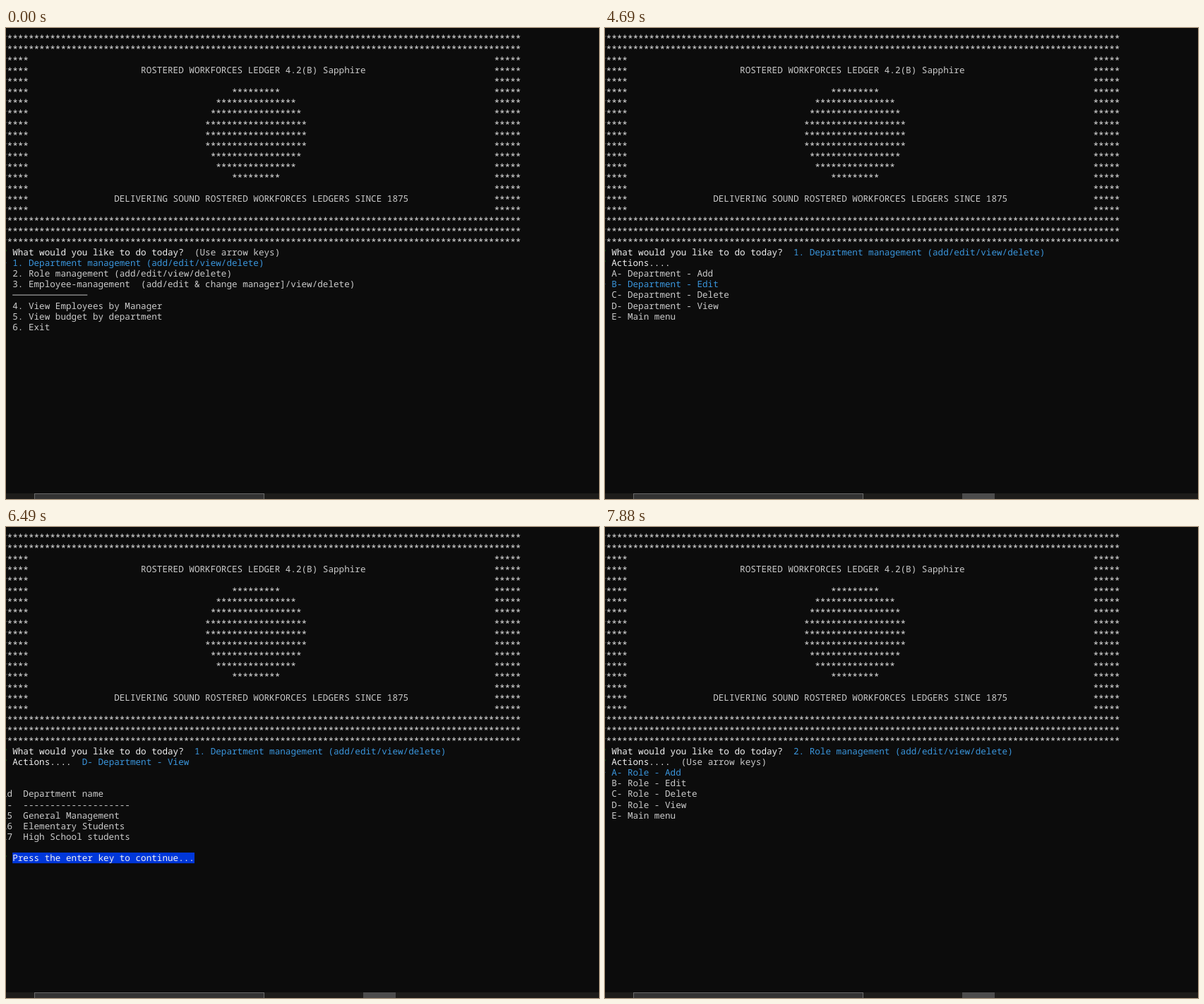
An HTML page for the animation above (8 s loop, 840 px wide and 667 px high).

```html
<!DOCTYPE html>
<html lang="en">
<head>
<meta charset="utf-8">
<title>Terminal menu</title>
<style>
  html, body { margin: 0; width: 100%; height: 100%; overflow: hidden; background: #0c0c0c; }
  #stage { position: relative; width: 840px; height: 667px; overflow: hidden; background: #0c0c0c; }
  /* Console of 8 x 16 cells, shown slightly reduced */
  #console {
    position: absolute; left: -5.9px; top: 6px;
    transform: scale(.948); transform-origin: 0 0;
    font: 13.3333px/16px "Noto Sans Mono", "DejaVu Sans Mono", monospace;
    text-rendering: geometricPrecision; font-variant-ligatures: none;
    color: #ccc;
  }
  pre { position: absolute; left: 0; margin: 0; font: inherit; white-space: pre; }
  .stars { top: 1px; color: #e8e8e8; }
  .titles { top: 0; }
  .screen { top: 320px; opacity: 0; }
  .q { color: #13a10e; }
  .bright { color: #f2f2f2; }
  .pick { color: #3a96dd; }
  .bar { position: absolute; left: 16px; width: 272px; height: 16px; background: #0037da; color: #f2f2f2; }
  .rule { display: inline-block; width: 112px; height: 1px; background: #ccc; vertical-align: 4px; }
  #caret { position: absolute; left: 296px; top: 492px; width: 8px; height: 4px; background: #ccc; opacity: 0; }
  #taskbar { position: absolute; left: 0; top: 659px; width: 840px; height: 8px; background: #1d1c1a; }
  #taskbar i { position: absolute; top: 0; height: 8px; box-sizing: border-box; }
  #window { left: 40px; width: 326px; background: #333; border: 1px solid #686868; border-bottom: 0; }
  #hover { left: 506px; width: 46px; background: #4c4c4c; opacity: 0; }
  .pointer { position: absolute; width: 12px; height: 19px; opacity: 0; }
</style>
</head>
<body>
<div id="stage">
  <div id="console"><div id="caret"></div></div>
  <div id="taskbar"><i id="window"></i><i id="hover"></i></div>
</div>
<script>
const LOOP = 8000;
const stage = document.getElementById('stage');
const terminal = document.getElementById('console');

// Shows an element between two times of the loop, with hard cuts.
function during(el, from, to) {
  const key = (time, opacity) => ({ offset: time / LOOP, opacity, easing: 'steps(1, end)' });
  const keys = [key(from, 1), key(to, 0)];
  if (from > 0) keys.unshift(key(0, 0));
  if (to < LOOP) keys.push(key(LOOP, 0));
  el.animate(keys, { duration: LOOP, iterations: Infinity });
}

function addPre(className, lines) {
  const pre = document.createElement('pre');
  pre.className = className;
  pre.innerHTML = lines.join('\n');
  terminal.append(pre);
  return pre;
}

const span = (name, text) => `<span class="${name}">${text}</span>`;
const stars = n => '*'.repeat(n);

// Banner: a frame of stars around a round emblem
function bannerRow(row) {
  if (row < 2 || row > 16) return stars(97);
  const dy = (row - 9) * 16;
  const half = Math.abs(row - 9) < 5 ? Math.round(Math.sqrt(72 * 72 - dy * dy) / 8) : -1;
  const disc = half < 0 ? '' : ' '.repeat(42 - half) + stars(2 * half + 1);
  return stars(5) + disc.padEnd(87) + stars(5);
}
addPre('stars', Array.from({ length: 20 }, (_, row) => bannerRow(row)));

const titles = Array(16).fill('');
titles[3] = ' '.repeat(26) + 'ROSTERED WORKFORCES LEDGER 4.2(B) Sapphire';
titles[15] = ' '.repeat(21) + 'DELIVERING SOUND ROSTERED WORKFORCES LEDGERS SINCE 1875';
addPre('titles', titles);

// Menus
const HINT = '(Use arrow keys)';
const TASKS = [
  '1. Department management (add/edit/view/delete)',
  '2. Role management (add/edit/view/delete)',
  '3. Employee-management  (add/edit &amp; change manager]/view/delete)',
  '<i class="rule"></i>',
  '4. View Employees by Manager',
  '5. View budget by department',
  '6. Exit'
];
const actions = subject => [
  ...['Add', 'Edit', 'Delete', 'View'].map((verb, i) => `${'ABCD'[i]}- ${subject} - ${verb}`),
  'E- Main menu'
];

const ask = (text, tail = '') => `${span('q', '?')} ${span('bright', text)}  ${tail}`;
const askTask = tail => ask('What would you like to do today?', tail);
const askAction = tail => ask('Actions....', tail);
const answer = text => span('pick', text);
const list = (items, chosen) =>
  items.map((item, i) => i === chosen ? span('pick', '&gt; ' + item) : '  ' + item);

const mainMenu = (chosen, hint) => [askTask(hint), ...list(TASKS, chosen)];
const actionMenu = (task, subject, chosen, hint) =>
  [askTask(answer(TASKS[task])), askAction(hint), ...list(actions(subject), chosen)];
const departments = (chosen, hint) => actionMenu(0, 'Department', chosen, hint);

const departmentTable = [
  askTask(answer(TASKS[0])),
  askAction(answer('D- Department - View')),
  '', '',
  'id  Department name',
  '--  ' + '-'.repeat(20),
  '15  General Management',
  '16  Elementary Students',
  '17  High School students',
  '',
  span('q', '?') + ' ' + span('bar', 'Press the enter key to continue...')
];

const timeline = [
  [0, mainMenu(0, HINT)],
  [3530, departments(0, HINT)],
  [4690, departments(1)],
  [4840, departments(2)],
  [5010, [askTask(answer(TASKS[0]))]],
  [5080, departments(3)],
  [5390, departmentTable],
  [6870, []],
  [6950, mainMenu(0, HINT)],
  [7500, mainMenu(1)],
  [7880, actionMenu(1, 'Role', 0, HINT)]
];
timeline.forEach(([start, lines], i) => {
  const end = i + 1 < timeline.length ? timeline[i + 1][0] : LOOP;
  during(addPre('screen', lines), start, end);
});

during(document.getElementById('caret'), 5940, 6490);
during(document.getElementById('hover'), 1280, LOOP);

// Mouse pointer passing down to the taskbar
const ARROW = '<svg width="12" height="19"><path d="M.5 .5V15.5L4 12.2L6.4 17.8L8.6 16.8L6.2 11.4H11Z" fill="#fff" stroke="#000"/></svg>';
[[500, 783, 575], [577, 778, 609], [653, 772, 647]].forEach(([start, x, y]) => {
  const pointer = document.createElement('div');
  pointer.className = 'pointer';
  pointer.style.left = x + 'px';
  pointer.style.top = y + 'px';
  pointer.innerHTML = ARROW;
  stage.append(pointer);
  during(pointer, start, start + 77);
});
</script>
</body>
</html>
```
